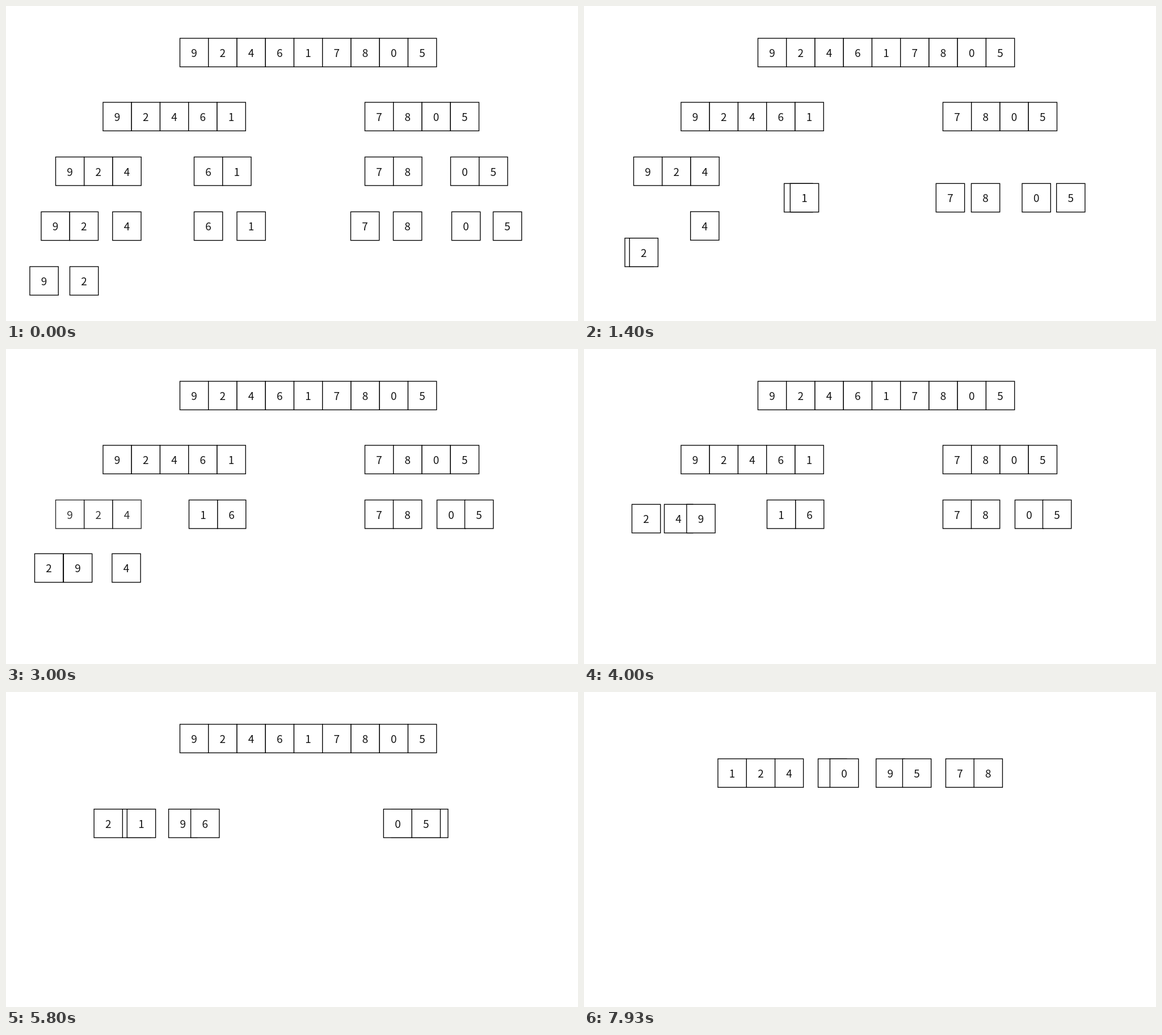
Animation, 1008 px wide and 556 px high, one loop 8000 ms. Source, as an HTML page with a canvas:

```html
<!DOCTYPE html>
<html lang="en">
<head>
<meta charset="utf-8">
<title>Merge sort</title>
<style>
html, body { margin: 0; width: 100%; height: 100%; overflow: hidden; background: #fff; }
canvas { display: block; }
</style>
</head>
<body>
<canvas width="1008" height="556"></canvas>
<script>
const ctx = document.querySelector('canvas').getContext('2d');
const LOOP = 8000, STEP = 200 / 3, MOVE = 1500, FADE = 300, PITCH = 50.25;
const starts = [893, 2960, 5200, 7427];

// Unsorted arrays: left, top, digits, merge that removes them
const arrays = [
  [306.5, 57, '924617805', 3],
  [171, 170, '92461', 2], [632.5, 170, '7805', 2],
  [87.5, 266.5, '924', 1], [331.5, 266.5, '61', 0],
  [632.5, 266.5, '78', 0], [783.5, 266.5, '05', 0],
  [62, 363.3, '92', 0]
];

// Moving cells from back to front: digit, left edge before and after each merge
const SORTED = '012456789';
const cells = [
  ['4', 187.8, 187.6, 137.5, 246.5],
  ['9', 42, 100.2, 188, 347.2],
  ['2', 112.5, 50, 87.5, 196.7],
  ['6', 331.5, 372.5, 372.5, 296.8],
  ['1', 407, 322.5, 322.5, 146.3],
  ['7', 607.5, 632.5, 632.5, 707.8],
  ['8', 682.5, 682.5, 682.5, 757],
  ['0', 785.5, 759.5, 759.5, 607.5],
  ['5', 858.5, 808.5, 808.5, 657.8]
].map(([digit, ...xs]) => ({
  digit,
  xs: [...xs, 270 + PITCH * SORTED.indexOf(digit)],
  ys: ['92'.includes(digit) ? 460 : 363.3, '924'.includes(digit) ? 362.7 : 266.5, 266.5, 170, 69]
}));

// cubic-bezier(.25, .1, .35, 1)
function ease(u) {
  if (u <= 0 || u >= 1) return u <= 0 ? 0 : 1;
  const curve = (s, a, b) => 3 * (1 - s) ** 2 * s * a + 3 * (1 - s) * s * s * b + s ** 3;
  let lo = 0, hi = 1;
  for (let i = 0; i < 24; i++) {
    const mid = (lo + hi) / 2;
    if (curve(mid, .25, .35) < u) lo = mid; else hi = mid;
  }
  return curve(lo, .1, 1);
}

function drawCell(x, y, digit) {
  ctx.fillStyle = '#fff';
  ctx.fillRect(x, y, PITCH, 50.4);
  ctx.strokeRect(x, y, PITCH, 50.4);
  ctx.fillStyle = '#111';
  ctx.fillText(digit, x + 25.1, y + 33);
}

function draw(time) {
  // The motion advances 15 times a second
  const t = Math.min(119, Math.floor(time / STEP + .15)) * STEP;
  ctx.fillStyle = '#fff';
  ctx.fillRect(0, 0, 1008, 556);
  ctx.font = '300 19px "Noto Sans CJK SC", "Noto Sans CJK JP", "Noto Sans CJK", "Noto Sans", sans-serif';
  ctx.textAlign = 'center';
  ctx.strokeStyle = '#000';
  ctx.lineWidth = 1.35;

  for (const [x, y, digits, merge] of arrays) {
    ctx.globalAlpha = Math.max(0, Math.min(1, 1 - (t - starts[merge]) / FADE));
    if (ctx.globalAlpha) [...digits].forEach((d, i) => drawCell(x + i * PITCH, y, d));
  }
  ctx.globalAlpha = 1;

  const progress = starts.map(start => ease((t - start) / MOVE));
  const at = points => progress.reduce((v, p, i) => v + p * (points[i + 1] - points[i]), points[0]);
  for (const { digit, xs, ys } of cells) drawCell(at(xs), at(ys), digit);
}

const begin = performance.now();
function tick() {
  draw((performance.now() - begin) % LOOP);
  requestAnimationFrame(tick);
}
tick();
</script>
</body>
</html>
```
